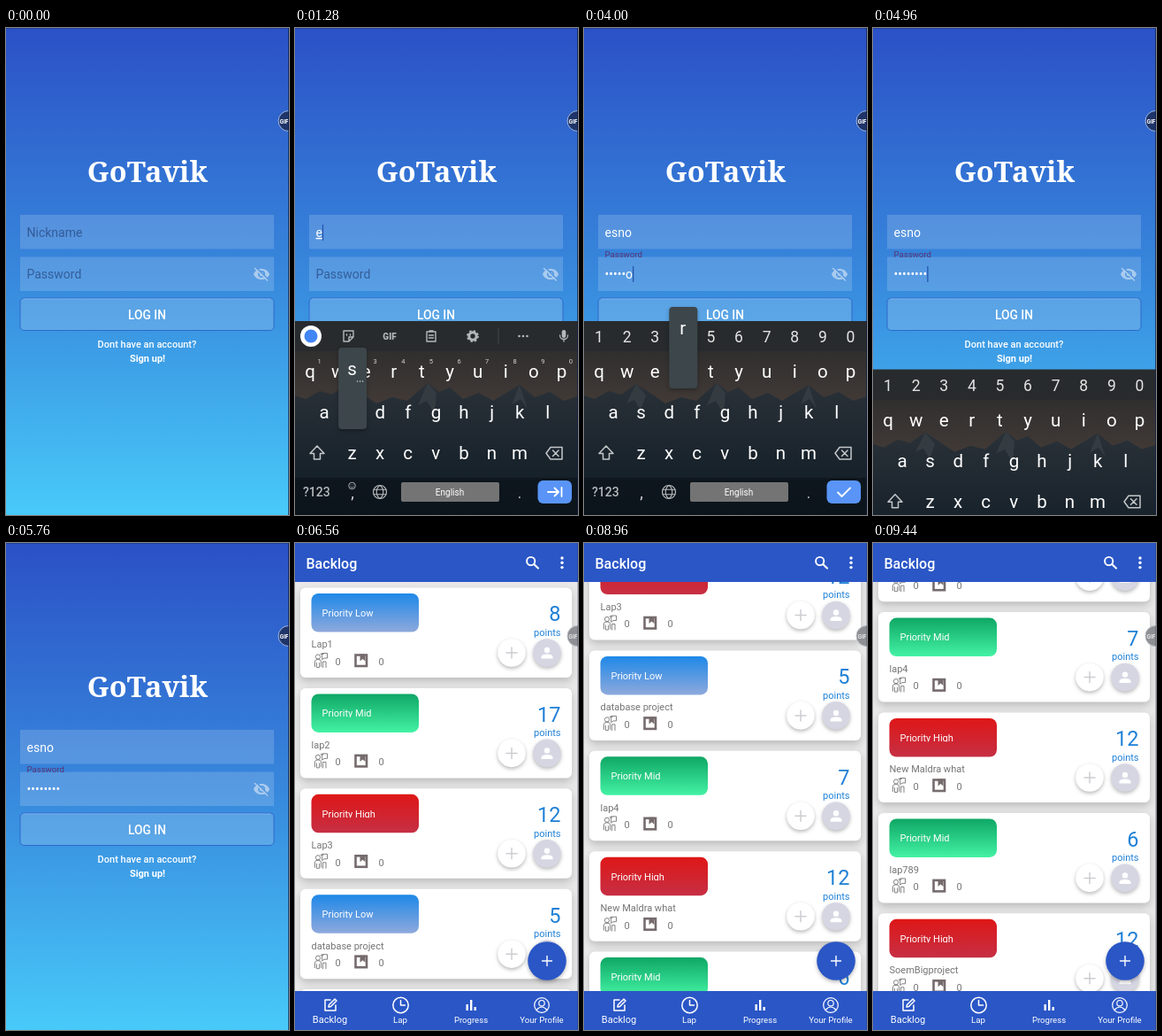
Recreate the animation shown at these times as an HTML page. Size 320x550 px, loop 9600 ms.

```html
<!DOCTYPE html>
<html lang="en">
<head>
<meta charset="utf-8">
<title>Login and backlog</title>
<style>
html, body { margin: 0; height: 100%; overflow: hidden; background: #2b50c4 }
svg { display: block; width: 100%; height: 100%; font-family: Roboto, sans-serif }
.line { fill: none; stroke-linecap: round; stroke-linejoin: round }
.card { filter: drop-shadow(0 4px 5px rgba(0,0,0,.2)) }
.lift { filter: drop-shadow(0 2px 2px rgba(0,0,0,.28)) }
.logo { font-family: "Noto Serif", serif }
</style>
</head>
<body>
<svg viewBox="0 0 320 550">
  <defs>
    <linearGradient id="sky" x2="0" y2="1"><stop stop-color="#2b51c6"/><stop offset=".5" stop-color="#3787dc"/><stop offset="1" stop-color="#48caf9"/></linearGradient>
    <linearGradient id="dusk" x2="0" y2="1"><stop stop-color="#26282a"/><stop offset=".45" stop-color="#433b37"/><stop offset="1" stop-color="#2a2c2f"/></linearGradient>
    <linearGradient id="rock" x2="0" y2="1"><stop stop-color="#2a3138"/><stop offset="1" stop-color="#0e1a24"/></linearGradient>
    <linearGradient id="Low" x2="0" y2="1"><stop stop-color="#1e88e8"/><stop offset="1" stop-color="#8ea9dc"/></linearGradient>
    <linearGradient id="Mid" x2="0" y2="1"><stop stop-color="#0fa765"/><stop offset="1" stop-color="#43f2a4"/></linearGradient>
    <linearGradient id="High" x2="0" y2="1"><stop stop-color="#de1717"/><stop offset="1" stop-color="#c62f44"/></linearGradient>
    <clipPath id="cut"><rect width="160" height="33"/></clipPath>
  </defs>
  <g id="stage"></g>
</svg>
<script>
const LOOP = 9600, STEP = 160, BLUE = '#2a56c6';
const stage = document.getElementById('stage');
const measure = document.createElement('canvas').getContext('2d');

const clamp = v => Math.max(0, Math.min(1, v));
const smooth = u => u * u * u * (u * (6 * u - 15) + 10);

// y is the middle of the capital letters
const text = (x, y, s, size, fill = '#fff', anchor = 'start', extra = '') =>
  `<text x="${x}" y="${y + size * .355}" font-size="${size}" fill="${fill}" text-anchor="${anchor}" ${extra}>${s}</text>`;
const mid = (x, y, s, size, fill, extra) => text(x, y, s, size, fill, 'middle', extra);
const rect = (x, y, w, h, fill, r = 0, extra = '') =>
  `<rect x="${x}" y="${y}" width="${w}" height="${h}" rx="${r}" fill="${fill}" ${extra}/>`;
const circle = (x, y, r, fill, extra = '') => `<circle cx="${x}" cy="${y}" r="${r}" fill="${fill}" ${extra}/>`;
const line = (d, color = '#fff', w = 1.5) => `<path class="line" d="${d}" stroke="${color}" stroke-width="${w}"/>`;
const fill = (d, color = '#fff') => `<path d="${d}" fill="${color}" fill-rule="evenodd"/>`;
const move = (x, y, body, extra = '') => `<g transform="translate(${x} ${y})" ${extra}>${body}</g>`;

const NAME = 'esno', PASS = 'password';
const nameTimes = [1120, 1280, 1440, 1600, 1920];
const passTimes = [2880, 3040, 3200, 3520, 3680, 3840, 4000, 4160, 4320];

// A pressed key shows its popup first and enters the field at the next press
function typing(word, times, t) {
  const n = times.filter(v => v <= t).length;
  return { typed: word.slice(0, Math.max(0, n - 1)), key: n && n <= word.length ? word[n - 1] : '' };
}

function caret(s, y) {
  measure.font = '14px Roboto, sans-serif';
  return rect(23.5 + measure.measureText(s).width, y - 9, 1.2, 18, '#2450a8');
}

function login(t, name, pass) {
  const inName = t >= 480 && t < 2400, inPass = t >= 2400 && t < 5760;
  const shown = '•'.repeat(pass.length);
  const masked = pass && t < 4320 ? shown.slice(1) + pass.at(-1) : shown;
  const rise = clamp((t - 2240) / 320);
  const hint = 'rgba(22,45,95,.55)';
  let s = rect(0, 0, 320, 550, 'url(#sky)') + rect(0, 0, 320, 1, 'rgba(20,35,90,.4)');
  s += mid(160, 162, 'GoTavik', 32.5, '#fff', 'class="logo" font-weight="900"');
  s += rect(16, 211, 287, 38.5, 'rgba(255,255,255,.16)') + rect(16, 258.5, 287, 38.5, 'rgba(255,255,255,.16)');
  s += name ? text(23.5, 231, name, 14, '#fff', 'start', inName ? 'text-decoration="underline"' : '')
    : t < 640 ? text(23.5, 231, 'Nickname', 14, hint, 'start', inName ? 'opacity=".5"' : '') : '';
  s += text(23.5, 278 - 22.5 * rise, 'Password', 14 - 4.4 * rise, rise ? '#5b326f' : hint);
  s += text(23.5, 278, masked, 14);
  if (inName) s += caret(name, 231);
  if (inPass) s += caret(masked, 278);
  s += move(289, 278, fill('M-9 0C-6 -8 6 -8 9 0 6 8 -6 8 -9 0zM-4 0a4 4 0 1 0 8 0a4 4 0 1 0 -8 0z', '#a9cbef')
    + circle(0, 0, 2.3, '#a9cbef') + line('M-6 -7.5L8 6.5', '#5597df', 1.6) + line('M-7.5 -6.5L6.5 7', '#a9cbef', 1.6));
  s += rect(16, 305, 287, 36.5, 'rgba(255,255,255,.17)', 4.5, 'stroke="#2c69cb"');
  s += line('M20 305.9H299', 'rgba(255,255,255,.35)', .7);
  s += mid(159.5, 324, 'LOG IN', 13.8, '#fff', 'font-weight="500"');
  s += mid(159.5, 357.5, 'Dont have an account?', 11, '#fff', 'font-weight="500"');
  return s + mid(160, 373, 'Sign up!', 11, '#fff', 'font-weight="700"');
}

const rows = [['qwertyuiop', 17, 388], ['asdfghjkl', 33, 434], ['zxcvbnm', 64.5, 480]];
const keys = rows.flatMap(([letters, x, y]) => [...letters].map((c, i) => ({ c, x: x + i * 31.6, y })));

function toolbar() {
  const grey = '#b4b8ba';
  let s = circle(18, 348, 12, '#fff') + circle(18, 348, 7.5, '#4285f4');
  s += line('M55 342H66V349L61 354H55zM66 349H61V354M58.5 346V347M62.5 346V347', grey, 1.4);
  s += mid(107, 348, 'GIF', 10, grey, 'font-weight="900"');
  s += line('M149 343H159V354H149zM152 342H156M151.5 347H156.5M151.5 350H156.5', grey, 1.4);
  s += circle(201, 348, 4.2, 'none', `stroke="${grey}" stroke-width="3"`);
  s += circle(201, 348, 6.1, 'none', `stroke="${grey}" stroke-width="1.6" stroke-dasharray="2.4"`);
  s += line('M230 339V357', '#44484a', 1);
  for (const x of [253.5, 258, 262.5]) s += circle(x, 348, 1.3, grey);
  s += rect(301.7, 341, 4.6, 9, grey, 2.3) + line('M299.5 347a4.5 4.5 0 0 0 9 0M304 351.5V354', grey, 1.3);
  [...'1234567890'].forEach((n, i) => s += mid(27.5 + i * 31.6, 376.5, n, 7.5, '#d5d5d5'));
  return s + circle(64.5, 517, 3.8, 'none', 'stroke="#b5b9bc" stroke-width=".9"') + line('M62.7 518a2 2 0 0 0 3.6 0M63.2 516V516M65.8 516V516', '#b5b9bc', .9);
}

function keyboard(numeric, key) {
  let s = rect(0, 331, 320, 219, 'url(#dusk)');
  s += fill('M0 415L12 419 28 410 42 414 59 402 76 413 92 424 110 417 127 421 150 401 163 411 175 406 190 419 208 412 224 421 254 403 271 417 288 411 304 421 320 416V550H0z', 'url(#rock)');
  s += fill('M59 402L48 424 57 420 64 432 70 415zM150 401L139 426 149 421 158 436 160 412zM254 403L245 425 255 419 263 430z', '#343b41');
  s += rect(0, 508, 320, 42, 'rgba(10,15,20,.55)') + rect(0, 331, 320, 34, '#282b2d');
  s += numeric ? [...'1234567890'].map((n, i) => mid(17 + i * 31.6, 349, n, 17.5, '#e4e4e4')).join('') : toolbar();
  for (const k of keys) s += mid(k.x, k.y, k.c, 20.5, '#fff');
  s += line('M25 472L17 480.5H21.5V487H28.5V480.5H33z', '#c3c7c9', 1.5);
  s += line('M289 473.5H302V487H289L284 480.2zM291.5 477L298 483.5M298 477L291.5 483.5', '#c3c7c9', 1.5);
  s += text(9, 524, '?123', 14, '#b6babd', 'start', 'font-weight="500"') + mid(65, 525, ',', 18, '#d4d6d8');
  s += move(96, 524, circle(0, 0, 7.5, 'none', 'stroke="#b6babd" stroke-width="1.2"')
    + line('M-7 -2.7H7M-7 2.7H7M0 -7.5C-5 -4 -5 4 0 7.5C5 4 5 -4 0 -7.5', '#b6babd', 1.1));
  s += rect(120, 513, 111, 22, '#747474', 2) + mid(175, 524, 'English', 10) + mid(254, 525, '.', 17, '#d4d6d8');
  s += rect(274.5, 511, 38.5, 26, '#5994f6', 6);
  s += numeric ? line('M287 524.5L291.5 529 301 519.5', '#fff', 1.8) : line('M286 524H298M293.5 519.5L298 524 293.5 528.5M301.5 519V529', '#fff', 1.8);
  const k = key && keys.find(k => k.c === key);
  if (k) {
    s += rect(k.x - 15.5, k.y - 73, 32, 92, '#3c464b', 4, 'class="lift"') + mid(k.x, k.y - 49, key, 20.5, '#fff');
    if (!numeric) s += [6, 9, 12].map(d => circle(k.x + d, k.y - 35, .8, '#d0d3d5')).join('');
  }
  return s;
}

const cards = [['Low', 'Lap1', 8], ['Mid', 'lap2', 17], ['High', 'Lap3', 12], ['Low', 'database project', 5],
  ['Mid', 'lap4', 7], ['High', 'New Maldra what', 12], ['Mid', 'lap789', 6], ['High', 'SoemBigproject', 12]];

function card([level, title, points]) {
  const grey = '#757575', ink = '#1f80d6';
  let s = rect(6, 0, 307, 101.5, '#fff', 6, 'class="card"');
  s += rect(18.5, 6.5, 121.5, 43.5, `url(#${level})`, 8);
  s += `<g clip-path="url(#cut)">${text(30.5, 28.5, 'Priority ' + level, 11)}</g>`;
  s += text(18.5, 64, title, 11, grey) + text(45.5, 83.5, 0, 11, grey) + text(94.5, 83.5, 0, 11, grey);
  s += circle(26, 78, 2.6, 'none', `stroke="${grey}" stroke-width=".9"`);
  s += line('M22.5 89V83Q22.5 81 26 81T29.5 83V89M24.5 85V90H27.5V85M29 75H32M31 74H36.5V79.5H33L31 81zM31.5 90V83.5H35V90', grey, .9);
  s += rect(68.5, 76, 12.5, 12.5, 'none', 0, 'stroke="#756b6d" stroke-width="2.6"') + fill('M73.5 75H79.5V83L76.5 80.5 73.5 83z', '#756b6d');
  s += text(300.5, 29.5, points, 23.5, ink, 'end') + text(300.5, 50.5, 'points', 11, ink, 'end');
  s += circle(245, 73.5, 15.8, '#fff', 'class="lift"') + line('M239 73.5H251M245 67.5V79.5', '#cdcdd2', 1.5);
  s += circle(285, 73.5, 15.8, '#d6d6e3', 'class="lift"') + circle(285, 70.5, 3.2, '#fff');
  return s + fill('M278.5 80V78Q279 75 285 75T291.5 78V80z');
}

function backlog(scroll) {
  let s = rect(0, 0, 320, 550, '#e9e9e9');
  cards.forEach((c, i) => {
    const y = 50.5 + i * 113.4 - scroll;
    if (y > -110 && y < 510) s += move(0, y, card(c));
  });
  s += circle(285, 472, 21.8, BLUE, 'class="lift"') + line('M279.5 472H290.5M285 466.5V477.5', '#fff', 1.4);
  s += rect(0, 0, 320, 44, BLUE) + text(12.5, 23, 'Backlog', 16, '#fff', 'start', 'font-weight="500"');
  s += circle(266.7, 20.5, 4.6, 'none', 'stroke="#fff" stroke-width="1.9"') + line('M270.5 24.3L275 28.6', '#fff', 2.1);
  for (const y of [17, 22.3, 27.6]) s += circle(302, y, 1.7, '#fff');
  s += rect(0, 506, 320, 44, BLUE);
  s += line('M40 516H34V528H46V522M38 524L38.5 521.5 45 515 47 517 40.5 523.5z', '#fff', 1.5);
  s += circle(119.5, 522, 8.7, 'none', 'stroke="#fff" stroke-width="1.5"') + line('M119.5 516.5V522H124.5');
  s += rect(193.5, 521, 2.4, 7, '#fff') + rect(198, 516, 2.4, 12, '#fff') + rect(202.5, 524, 2.4, 4, '#fff');
  s += circle(279, 522, 8.3, 'none', 'stroke="#fff" stroke-width="1.2"') + circle(279, 519.7, 3.2, 'none', 'stroke="#fff" stroke-width="1.2"');
  s += line('M273 527.5Q279 520.5 285 527.5', '#fff', 1.2);
  return s + mid(39.5, 538.5, 'Backlog', 11) + mid(119, 539, 'Lap', 9.8) + mid(199, 539, 'Progress', 9.6) + mid(279, 539, 'Your Profile', 9.6);
}

function recorder(onList) {
  return circle(319.5, 105, 11.5, onList ? '#8d8f94' : '#1f3468', `stroke="${onList ? '#b9bbc0' : '#9db9ea'}"`)
    + text(309.5, 105.5, 'GIF', 6.5, onList ? '#e2e2e2' : '#fff', 'start', 'font-weight="700"')
    + rect(319, 0, 1, 550, onList ? 'rgba(40,50,80,.25)' : 'rgba(15,30,70,.7)');
}

function scene(t) {
  const open = clamp((t - 320) / 480), close = clamp((t - 4640) / 640);
  const first = typing(NAME, nameTimes, t), second = typing(PASS, passTimes, t);
  const enter = clamp((t - 6080) / 480);
  let s = '';
  if (enter < 1) {
    s += login(t, first.typed, second.typed);
    if (open > 0 && close < 1) {
      const drop = 219 * ((1 - open) ** 2 + close ** 2);
      s += move(0, drop, keyboard(t >= 2560, first.key || second.key));
    }
  }
  if (enter > 0) s += move(0, 30 * (1 - enter) ** 2, backlog(426 * smooth(clamp((t - 8320) / 1120))), `opacity="${enter}"`);
  return s + recorder(enter > .5);
}

let last = -1;
function tick() {
  // The screen advances in fixed steps
  const t = Math.floor(performance.now() % LOOP / STEP) * STEP;
  if (t !== last) stage.innerHTML = scene(last = t);
  requestAnimationFrame(tick);
}
tick();
</script>
</body>
</html>
```
